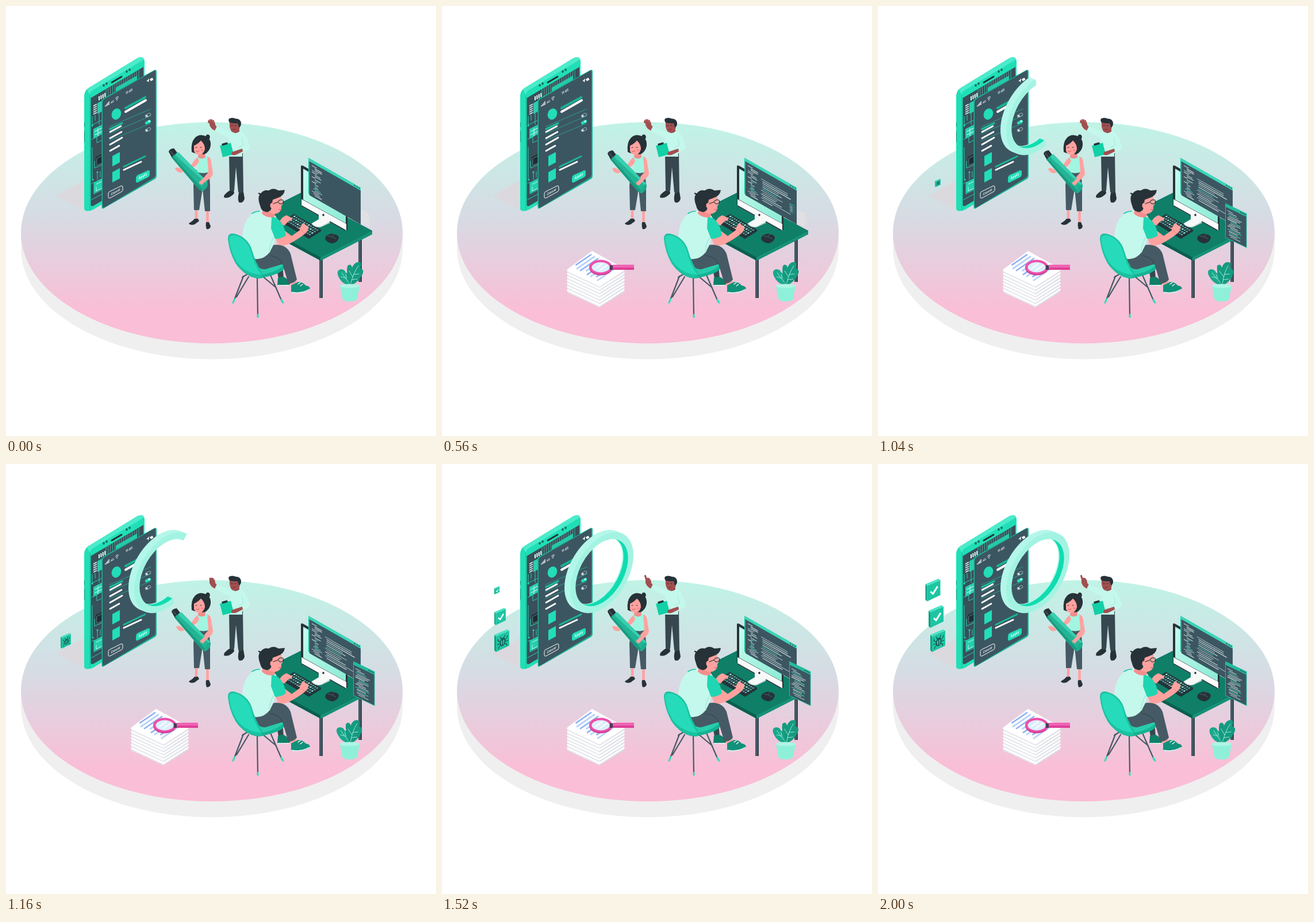
An HTML page with a canvas for the animation above (2.04 s loop, 748 px wide and 748 px high).

```html
<!DOCTYPE html>
<html lang="en">
<head>
<meta charset="utf-8">
<title>App testing team</title>
<style>
html, body { margin: 0; width: 100%; height: 100%; overflow: hidden; background: #fff; }
canvas { display: block; width: 748px; height: 748px; }
</style>
</head>
<body>
<canvas id="stage" width="748" height="748"></canvas>
<script>
const ctx = document.getElementById('stage').getContext('2d');
const LOOP = 2040, STEP = 40, TAU = Math.PI * 2;
const DARK = '#263238', SLATE = '#455a64', PANEL = '#3c5661', GREEN = '#22ddb8',
  MINT = '#a2f5e1', PALE = '#c4f8ec', DEEP = '#0f7f68', SKIN = '#ffa29f', BROWN = '#a24f50';

const ramp = (t, a, b) => Math.min(1, Math.max(0, (t - a) / (b - a)));
const paths = {};
const path = d => paths[d] || (paths[d] = new Path2D(d));
function fill(d, color) { ctx.fillStyle = color; ctx.fill(path(d)); }
function line(d, color, w = 1, cap = 'round') {
  ctx.strokeStyle = color; ctx.lineWidth = w; ctx.lineCap = cap; ctx.lineJoin = 'round';
  ctx.stroke(path(d));
}
function oval(x, y, rx, ry, color, rot = 0) {
  ctx.beginPath(); ctx.ellipse(x, y, rx, ry, rot, 0, TAU);
  ctx.fillStyle = color; ctx.fill();
}
function group(draw, x = 0, y = 0, a = 1, b = 0, c = 0, d = 1) {
  ctx.save(); ctx.transform(a, b, c, d, x, y); draw(); ctx.restore();
}
const slanted = (x, y, k, draw) => group(draw, x, y, 1, k);
const scaled = (x, y, s, draw) => { if (s > 0) group(draw, x, y, s, 0, 0, s); };
function seeded(n) {
  return () => (n = (n * 16807) % 2147483647) / 2147483647;
}
function grad(x0, y0, x1, y1, ...colors) {
  const g = ctx.createLinearGradient(x0, y0, x1, y1);
  colors.forEach((c, i) => g.addColorStop(i / (colors.length - 1), c));
  return g;
}

function floor() {
  oval(358, 422, 332, 192.5, '#efefef');
  ctx.fillStyle = '#efefef'; ctx.fillRect(26, 395, 664, 27);
  oval(358, 394.5, 332, 192.5, grad(0, 202, 0, 530, '#c0f3e6', '#d7dbe4', '#fabed6'));
  fill('M88 330L137 302V356Z', '#dbd9de');
}

function phone() {
  fill('M136 353V157Q136 148 143 143L228 91Q240 85 241 96V300L152 354Q138 360 136 353Z', '#20dfb6');
  line('M146 155V355', '#18c7a2', 1.5);
  fill('M141 145L228 91Q238 86 240 93L150 147Q146 150 146 155Z', '#4cebcb');
  fill('M147.5 346V160L239 106V296L153 347Q147.5 350 147.5 346Z', '#37505a');
  line('M184 133L201 123', DARK, 3);
  for (const [x, y] of [[170, 138], [175, 135], [210, 114], [215, 111]]) oval(x, y, 1.8, 2.2, '#146c5d');
  line('M136.5 203V210M136.5 217V236', '#0c9f82', 1.2);

  // circuit board
  for (let i = 0; i < 16; i++) {
    const x = 174 + i * 3.8, y = 144 - i * 2.2;
    line(`M${x} ${y}V${y + 16}`, i % 3 ? '#6f8f92' : '#25b99a', 1, 'butt');
  }
  fill('M191 142L228 121V129L191 150Z', '#25c9a9');
  for (let i = 0; i < 4; i++) {
    const x = 162 + i * 3.4;
    line(`M${x} ${157 - i * 1.9}v7`, '#e9fffa', 2, 'butt');
  }
  for (let i = 0; i < 5; i++) line(`M152 ${174 + i * 3.6}l6 -3.4`, '#e6fbf6', 1.5, 'butt');
  fill('M159 169L180 157V176L159 188Z', '#28cfae');
  line('M150 192V207L166 199M155 190V199M162 186V206M149 232L158 228V238L166 234M150 246V300M154 270V282L167 276M149 309L153 306V327L167 320M159 290V302M164 288V298M149 337L167 327', '#2ccfb0', 1);
  fill('M152 214L167 206V223L152 231Z', '#2acdae');
  line('M155 218L167 212M155 224L167 218M160 213V226', '#baf8eb', 1.2);
  fill('M156 263L168 257V273L156 279Z', '#1c2d34');
  line('M158 265L168 260V273L158 277Z', '#68868c', 1);
  fill('M153 307L168 299V318L153 326Z', '#23cfae');
  line('M157 310L167 305M157 315V322L167 317', '#a9f3e2', 1.2);
  oval(150, 208, 1.5, 1.5, GREEN); oval(151, 302, 1.5, 1.5, GREEN); oval(159, 289, 1.5, 1.5, GREEN);
}

function toggle(x, y, on) {
  line(`M${x - 2.6} ${y + 1.5}l5.2 -3`, on ? GREEN : '#a8bbc0', 5);
  if (!on) line(`M${x - 2.6} ${y + 1.5}l5.2 -3`, PANEL, 3.4);
  oval(x + (on ? 2.2 : -2.2), y + (on ? -1.2 : 1.2), 1.6, 1.8, '#e8f5f3');
}

function label(text, x, y, size) {
  group(() => {
    ctx.font = `600 ${size}px Inter, Arial, sans-serif`;
    ctx.textAlign = 'center'; ctx.textBaseline = 'middle';
    ctx.fillStyle = '#fff'; ctx.fillText(text, 0, 0);
  }, x, y, .83, -.46);
}

function appPanel() {
  fill('M166.5 350V166Q166.5 163 169 161L257 112Q262 109 262 114V295Q262 299 259 301L170 352Q166.5 354 166.5 350Z', '#18b395');
  fill('M168 349V167Q168 164 171 162L257 113Q260 111 260 115V294Q260 297 257 299L172 350Q168 352 168 349Z', PANEL);
  for (let i = 0; i < 4; i++) line(`M${173 + i * 2} ${175 - i}v${-2 - i * 1.4}`, '#fff', 1.3, 'butt');
  label('4G', 185, 167, 5);
  line('M190.5 160.5Q193 157 195.5 158M191.5 162.5Q193 160 194.7 160.5', '#fff', 1);
  oval(193.2, 163.5, .8, .8, '#fff');
  label('11:45', 214, 149, 6);
  fill('M244 131L249 126L248 133L246.5 130.6Z', '#fff');
  line('M251 129L255.5 126.5', '#fff', 4, 'butt');
  oval(192, 188, 8, 10, GREEN, .4);
  line('M208 177.5L242 159', '#18b395', 4.2);
  line('M208 184L243 164', '#fff', 4);
  line('M180 210L252 179M180 222L252 191M180 234L252 204', '#27a991', .9);
  line('M181 214L202 204', '#1cbc9d', 3.2);
  line('M181 219L200 209M181 230L201 219M181 241L202 229M181 252L197 243', '#fff', 2.8);
  toggle(247, 190); toggle(247, 202, true); toggle(247, 215);
  fill('M185 261L198 254V272L185 279Z', GREEN);
  fill('M185 289L198 282V300L185 307Z', GREEN);
  line('M205 279.5L242 261.5', '#19b898', 3);
  line('M205 285L235 271', '#fff', 3);
  fill('M226 299Q226 296 229 294L247 286Q250 285 250 288V293Q250 296 247 298L229 307Q226 308 226 305Z', GREEN);
  label('Apply', 238, 296, 6.5);
  line('M178 326Q178 324 180 323L200 313Q203 312 203 315V320Q203 322 201 323L181 334Q178 335 178 332Z', '#fff', 1);
  label('Cancel', 190.5, 323.5, 5.8);
}

function tile(x, y, s, bug) {
  scaled(x, y, s, () => {
    fill('M-13 -11L-10 -8V19L-13 16Z', '#0c9f82');
    fill('M-13 -11L9.5 -20.5L13 -18L-10 -8Z', '#4be3c5');
    fill('M-10 -8L13 -18V8L-10 19Z', '#1dc5a3');
    if (!bug) return line('M-4 2L0 6L8 -7', '#fff', 3, 'butt');
    slanted(1.5, .5, -.43, () => {
      ctx.beginPath(); ctx.ellipse(0, 1, 4, 6.3, 0, 0, TAU);
      ctx.strokeStyle = '#17383c'; ctx.lineWidth = 1.2; ctx.stroke();
      line('M0 -4V7M-3 -3H3M-4 -1L-8 -4V-7M4 -1L8 -4V-7M-4 2H-9M4 2H9M-4 5L-7 8V10M4 5L7 8V10M-2 -5L-4 -9M2 -5L4 -9', '#17383c', 1);
    });
  });
}

function standingMan(point) {
  fill('M389 321Q378 328 379 333Q388 336 397 326L396 320Z', DARK);
  fill('M405 325Q402 339 406 342Q413 343 415 335L413 323Z', DARK);
  fill('M388 256H412L413 323Q408 327 404 324L400 280L397 321Q392 324 389 320Z', '#37474f');
  fill('M354 200Q357 196 361 199Q364 202 364 207L370 214L366 218Q357 215 354 207Z', BROWN);
  if (point > 0) line(`M356 203L${356 - 2.5 * point} ${203 - 8.5 * point}`, BROWN, 3);
  else {
    fill('M351 203Q351 197 356 197L362 199L358 206Z', BROWN);
    line('M354 200L357 197L361 202', '#c0706a', 1.2);
  }
  fill('M367 209Q380 216 391 218L410 218Q419 224 424 245Q424 249 419 251L411 254V262H387L388 230L363 217Z', PALE);
  line('M410 230L413 242L405 246', '#a5eadb', 1);
  fill('M393 209H405L406 218Q399 224 393 218Z', '#85393f');
  fill('M389 203Q397 198 407 204Q408 215 402 219Q397 222 392 218Q388 211 389 203Z', BROWN);
  fill('M388 196Q393 193 400 196Q408 196 409 204Q409 210 405 211L403 204Q394 204 389 203Q386 199 388 196Z', DARK);
  line('M392 208h2M398 208h2', DARK, 1.2);
  line('M394 215q3 1 5 -1', '#6d2e34', 1);
  fill('M372 243L391 238L396 258L377 263Z', '#13d0a6');
  line('M377 241L384 239', DARK, 3.4);
  fill('M393 254L411 248L412 253L402 258Q395 261 392 258Z', BROWN);
}

function ring(p) {
  if (p <= 0) return;
  const a0 = 1.3, a1 = a0 + TAU * p, inner = .83;
  const place = (k, draw) => group(draw, 268 + 10 * k, 185 + 4 * k, 55, -30.4, 0, 63.5);
  const band = (k, color) => place(k, () => {
    ctx.beginPath(); ctx.arc(0, 0, 1, a0, a1); ctx.arc(0, 0, inner, a1, a0, true);
    ctx.closePath(); ctx.fillStyle = color; ctx.fill();
  });
  for (let k = 0; k < 1; k += .2) band(k, '#b4f7ea');
  ctx.save();
  place(1, () => { ctx.beginPath(); ctx.arc(0, 0, inner, 0, TAU); });
  ctx.clip();
  for (let k = .2; k < 1; k += .2) band(k, '#10dcb0');
  ctx.restore();
  band(1, '#a3f3e2');
}

function handle(off) {
  group(() => {
    fill('M288 257Q289 252 297 251L304 260L294 268Z', DARK);
    line('M291 256L298 265', '#4a5a62', 1.5);
    fill('M293 267L303 258Q306 258 308 261L355 309Q357 318 347 326L340 322Z', '#23b495');
    fill('M301 260L303 258Q306 258 308 261L355 309L353 312L301 264Z', '#38cfb0');
    fill('M293 267L295.5 265L346 321L345 325L340 322Z', '#189c81');
    fill('M355 309Q359 318 347 326Q345 316 355 309Z', '#1dab8e');
  }, -5 * off, -3.5 * off);
}

function woman(off) {
  line('M331 353L331 371M350.5 355L350.5 380', SKIN, 4.6, 'butt');
  fill('M328 370Q325 374 318 378Q320 382 328 380L336 374L334 370Z', DARK);
  fill('M348 376Q347 384 349 388Q355 389 356 383L353 376Z', DARK);
  fill('M330 285H353L355 312V357H346L342 318L336 355H327L326 312Z', SLATE);
  line('M342 318L342 301', '#34474f', 1);
  fill('M333 262Q343 259 351 262Q357 269 353 289Q341 293 331 288Q336 275 331 268Z', MINT);
  fill('M350 262Q356 262 357 272L360 291Q359 299 346 306L341 302L352 289Z', SKIN);
  fill('M333 263L336 270Q331 282 320 280L324 274Q328 267 333 263Z', SKIN);
  fill('M335 253H346L347 263Q341 268 334 263Z', '#f18d8c');
  fill('M323 254Q321 237 329 229Q337 221 349 227Q357 232 356 243Q354 254 345 258L328 256Z', DARK);
  oval(351, 228, 3.8, 4.5, DARK);
  fill('M327 243Q334 240 339 234Q346 240 346 249Q344 257 337 259Q329 259 327 252Z', SKIN);
  line('M330 246h2M338 246h2', DARK, 1.2);
  line('M331 253q3 1 5 -1', '#c84f5c', 1);
  oval(341, 251, 2, 1.4, '#ff8181');
  handle(off);
  group(() => {
    fill('M296 283Q300 280 306 284L311 289L306 291Q298 290 296 283Z', SKIN);
    fill('M355 292Q358 295 352 302L343 312Q337 311 338 307L346 300Z', SKIN);
  }, -2 * off, -off);
}

// rows of bars on a slanted editor face: [u, v, length, color]
function codeRows(seed, n, u0, v0, gap, min, max) {
  const r = seeded(seed), tints = ['#dff7f2', '#b7c8cd', '#46d9bb', '#e9eff0'];
  return Array.from({ length: n }, (_, i) =>
    [u0 + Math.floor(r() * 3) * 2.5, v0 + i * gap, min + r() * (max - min), tints[Math.floor(r() * 4)]]);
}
const sideRows = codeRows(41, 19, 6, 10, 2.75, 5, 14);
const mainRows = codeRows(97, 12, 29, 20, 3.25, 22, 54);
const popRows = codeRows(23, 16, 4, 11, 2.9, 9, 25);

function drawRows(rows, p = 1) {
  rows.forEach(([u, v, len, color], i) => {
    const show = ramp(p * rows.length, i, i + 1);
    if (show) line(`M${u.toFixed(1)} ${v.toFixed(1)}h${(len * show).toFixed(1)}`, color, 1.1, 'butt');
  });
}

function computer(type, pop) {
  fill('M513 279Q513 276 517 278L594 323V390L513 346Z', DARK);
  fill('M517 283L591 326V378L517 337Z', grad(517, 283, 590, 375, '#c9fbef', '#8cebd5'));
  fill('M514 336L592 379V389Q592 391 589 390L517 350Q514 348 514 345Z', '#fafafa');
  line('M515 348L590 390', '#273840', 1.7);
  fill('M544 358L564 369L563 376L547 384Q537 385 532 378L544 371Z', '#f7f8f8');
  line('M532 379Q539 386 548 384L563 377', '#cfdedc', 1.2);
  oval(552, 363.5, 1.7, 1.9, DARK);

  slanted(526, 264, .571, () => {
    fill('M0 0H91V64H3L0 62Z', '#19b99a');
    fill('M2 5H91V64H2Z', PANEL);
    fill('M0 0H91V5H0Z', '#3bd6b8');
    line('M80 2.5h1M84 2.5h1M88 2.5h.6', DARK, 1.6);
    drawRows(sideRows);
    drawRows(mainRows, type);
  });

  scaled(604, 343, pop, () => slanted(0, 0, .48, () => {
    fill('M0 0H37.5V60H0Z', '#22bc9e');
    fill('M1 6H36.5V59H1Z', PANEL);
    line('M27 3h.8M30.5 3h.8M34 3h.8', DARK, 1.5);
    drawRows(popRows);
  }));
}

function desk() {
  line('M548 437V508M616 403V480', SLATE, 6, 'butt');
  line('M550 440V508M618 403V480', '#33444c', 2, 'butt');
  fill('M513 325L637 391V397L547 443L423 376V370Z', '#0a5f4f');
  fill('M547 437L637 391V397L547 443Z', '#169278');
  fill('M513 325L637 391L547 437L423 370Z', DEEP);
  // keyboard
  fill('M482 373L501 362L548 389V392L527 405L482 378Z', '#22343b');
  group(() => {
    for (let r = 0; r < 4; r++)
      for (let c = 0; c < 12; c++) {
        ctx.fillStyle = (r * 5 + c) % 7 ? '#5ba99c' : MINT;
        ctx.fillRect(c * 3.6, r * 5, 2.2, 3);
      }
  }, 502, 364.5, 1, .6, -.86, .52);
  // mouse
  fill('M555 404Q557 397 567 396Q579 398 579 403Q577 411 568 413Q556 411 555 404Z', DARK);
  line('M560 400Q568 401 574 405M567 401L571 397', '#50646c', 1);
}

function paperGhost() {
  fill('M617 352L634 362V384L617 378Z', '#dcdce0');
  for (let i = 0; i < 6; i++) line(`M618 ${357 + i * 4}l13 5`, '#eeeef0', 1);
}

function seatedMan() {
  // chair legs
  line('M413 470L396 514M437 472L438 540M460 468L480 514M411 472L433 458M422 471L401 506M446 470L470 490', SLATE, 2.2);
  line('M397.5 510L395 516M438 537V541M479 511L482 516', '#35dfbf', 3.2);
  // far leg
  fill('M468 440L481 450L483 474L474 474Z', '#354850');
  fill('M473 473Q482 468 489 475Q498 478 496 483Q489 488 472 486Z', DEEP);
  line('M473 486H491', '#fff', 1.4);
  // seat
  fill('M420 440L476 441Q485 446 484 457Q477 467 440 474Q425 473 412 462Z', '#14b393');
  fill('M418 436L478 440Q486 445 482 452Q466 466 437 468Z', '#27cdad');
  // near leg
  fill('M493 479L504 476L507 485L496 488Z', SKIN);
  fill('M496 486Q502 483 508 480Q517 480 521 486Q531 488 528 493Q520 499 496 498Z', '#12917a');
  line('M497 498Q514 501 527 493', '#d9fff6', 1.3);
  line('M508 484l4 -3M512 487l4 -3', '#fff', 1.2);
  fill('M430 441L458 417Q486 410 495 431L506 476Q499 484 491 482L481 449L451 458Q438 459 430 441Z', SLATE);
  line('M480 449Q478 437 458 434', '#34464e', 1.2);
  // far hand
  fill('M474 378Q480 366 488 364L498 369Q499 373 492 374L484 382Z', SKIN);
  // torso
  fill('M411 400Q414 360 444 356L464 361Q477 370 472 390L466 414L459 428Q448 442 433 440Z', PALE);
  line('M466 402Q456 420 459 428', '#9ce8d7', 1.2);
  line('M428 361Q434 357 441 357', '#17c7a5', 1.6);
  // near arm
  fill('M466 398L485 391L497 400L511 390Q512 381 518 377L521 381L526 383Q527 391 519 397Q506 407 494 413Q480 420 473 414Z', SKIN);
  line('M515 391L520 396M512 388L506 385', '#ec7e80', 1);
  fill('M462 367Q475 366 484 386L487 399Q479 405 468 405L461 387Z', '#20d5b2');
  // head
  fill('M448 350L469 355L467 367Q454 370 445 361Z', '#f38e8d');
  fill('M456 335L478 329L482 344L479 348Q480 358 471 361Q460 363 455 356Z', SKIN);
  fill('M442 347Q436 331 444 325Q449 319 457 321Q465 315 474 321L485 320Q484 330 472 334L464 337L461 354Q456 361 449 357Q444 356 442 347Z', DARK);
  line('M440 326Q445 329 448 327', DARK, 2.5);
  oval(463, 347, 3.5, 4.5, SKIN);
  line('M465 344L473 341Q475 337 480 337Q484 338 482 343Q477 346 474 342', DARK, 1.2);
  line('M474 354q3 1 5 0', '#ce5661', 1);
  // chair back
  fill('M386 405Q386 394 397 396Q421 402 428 425Q433 444 446 465L443 474Q413 470 399 447Q388 427 386 405Z', '#1bc1a0');
  fill('M388 406Q388 397 399 399Q419 405 426 426Q431 449 444 467Q419 467 402 446Q390 427 388 406Z', '#25dbba');
}

function plant(sway) {
  group(() => {
    line('M598 488Q594 474 588 466M599 488Q602 470 609 454', '#0a806a', 2);
    fill('M597 486Q583 483 578 470Q574 460 582 458Q589 457 591 464Q597 464 599 474Z', '#1aa78b');
    fill('M597 482Q591 464 594 452Q600 447 602 455Q607 443 617 446Q619 451 616 456Q624 458 620 467Q612 481 602 485Z', '#159a80');
    line('M596 481Q589 472 584 464M590 473L583 471M592 474L591 467M600 482Q604 465 613 452M603 471L597 461M605 467L614 466M602 476L611 475', '#a5f1df', .9);
  }, -sway * 11.5, 0, 1, 0, sway * .0236, 1);
  fill('M581 487H615L611 509Q609 514 598 514Q587 514 585 509Z', '#8ff0da');
  oval(598, 487, 17, 3.4, '#aef5e5');
}

function papers(s) {
  scaled(269.5, 452, s, () => group(() => {
    for (let i = 6; i >= 0; i--) {
      group(() => {
        fill('M218 459L274 485V490L218 464Z', '#e6e8ec');
        fill('M274 485L317 458V463L274 490Z', '#dcdfe5');
        fill('M261 426L317 457L274 484L218 458Z', '#fff');
        line('M219 460L274 486L316 459', '#fff', 3.4);
      }, 0, i * 5.7);
    }
    for (let i = 0; i < 8; i++) {
      const x = 260 + i * 6, y = 432 + i * 3.4, k = i % 3 ? 1 : .86;
      line(`M${x} ${y}l${-32 * k} ${22 * k}`, i % 2 ? '#b3cff9' : '#8fb2f1', 2.6, 'butt');
    }
    oval(276, 455.5, 20, 13, '#c93a90');
    oval(276, 454, 20, 12.5, '#ee4fab');
    oval(276, 454.5, 15.5, 9, '#dceefc');
    line('M267 457L279 448M274 460L287 451', '#fff', 2);
    fill('M292 451H298V459H292Z', '#493a57');
    fill('M297 450H334V459H297Z', '#de3f98');
    fill('M297 450H334V455H297Z', '#f063b4');
  }, -269.5, -452));
}

function scene(t) {
  ctx.fillStyle = '#fff'; ctx.fillRect(0, 0, 748, 748);
  const off = 1 - ramp(t, 0, 440);
  const sweep = t < 1120
    ? .533 * ramp(t, 600, 1040) + .03 * ramp(t, 1040, 1120)
    : .563 + .437 * ramp(t, 1120, 1300);
  const sway = (Math.cos(TAU * t * 3 / LOOP) - 1) / 2 * -5;
  const grow = start => ramp(t, start, start + 380);

  floor();
  phone();
  appPanel();
  tile(104, 308, grow(900), true);
  tile(101, 266, grow(1230));
  tile(95.5, 220, grow(1385));
  standingMan(ramp(t, 1100, 1240));
  ring(sweep);
  woman(off);
  paperGhost();
  desk();
  computer(ramp(t, 330, 570), ramp(t, 480, 800));
  seatedMan();
  plant(sway);
  papers(ramp(t, 40, 560));
}

function tick() {
  const t = performance.now() % LOOP;
  scene(Math.floor(t / STEP) * STEP);
  requestAnimationFrame(tick);
}
tick();
</script>
</body>
</html>
```
